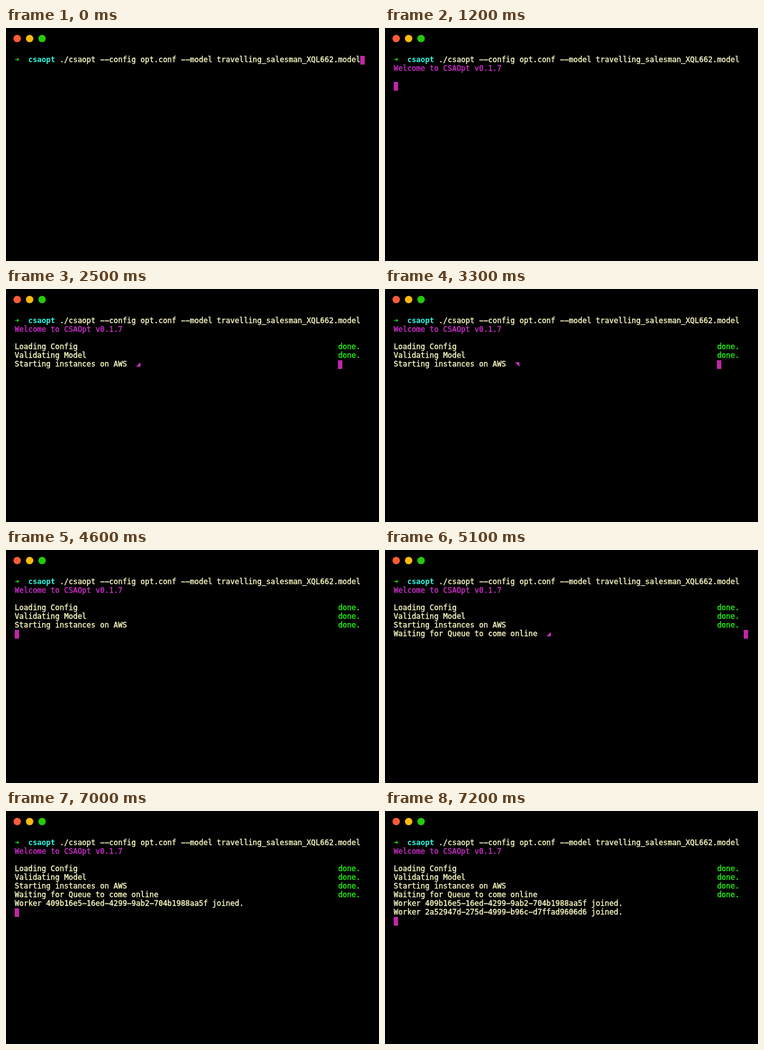
These frames come from a looping animation (600x376 px, 8000 ms). An HTML page with a canvas:

```html
<!DOCTYPE html>
<html lang="en">
<head>
<meta charset="utf-8">
<title>csaopt terminal</title>
<style>
  html, body { margin: 0; width: 100%; height: 100%; overflow: hidden; background: #000; }
  canvas { display: block; width: 600px; height: 376px; }
</style>
</head>
<body>
<canvas id="term" width="600" height="376"></canvas>
<script>
const canvas = document.getElementById('term');
const ratio = window.devicePixelRatio || 1;
canvas.width = 600 * ratio;
canvas.height = 376 * ratio;
const ctx = canvas.getContext('2d');
ctx.scale(ratio, ratio);

const LOOP = 8000;
const LEFT = 14, TOP = 44, CELL = 7.224, LINE = 14;
const FONT = '12px "DejaVu Sans Mono", monospace';
const CREAM = '#fffdc6', GREEN = '#22f914', CYAN = '#2cfce4';
const MAGENTA = '#cf2fcb', CURSOR = '#c126a8';

const colX = col => LEFT + col * CELL;
const rowY = row => TOP + row * LINE;

// Terminal output: time shown, row, column, text, colour
const output = [
  [0, 0, 0, '➜', GREEN, 'bold '],
  [0, 0, 3, 'csaopt', CYAN, 'bold '],
  [0, 0, 10, './csaopt --config opt.conf --model travelling_salesman_XQL662.model', CREAM],
  [1200, 1, 0, 'Welcome to CSAOpt v0.1.7', MAGENTA],
  [1700, 3, 0, 'Loading Config', CREAM],
  [1700, 3, 72, 'done.', GREEN],
  [2100, 4, 0, 'Validating Model', CREAM],
  [2100, 4, 72, 'done.', GREEN],
  [2500, 5, 0, 'Starting instances on AWS', CREAM],
  [4500, 5, 72, 'done.', GREEN],
  [4900, 6, 0, 'Waiting for Queue to come online', CREAM],
  [6500, 6, 72, 'done.', GREEN],
  [6600, 7, 0, 'Worker 409b16e5-16ed-4299-9ab2-704b1988aa5f joined.', CREAM],
  [7100, 8, 0, 'Worker 2a52947d-275d-4999-b96c-d7ffad9606d6 joined.', CREAM]
];

// Cursor stops: time, row, column
const stops = [
  [0, 0, 77], [1200, 3, 0], [1700, 4, 0], [2100, 5, 0], [2500, 5, 72],
  [4500, 6, 0], [4900, 6, 79], [5100, 6, 78], [6500, 7, 0], [6600, 8, 0], [7100, 9, 0]
];

// Each tick turns the triangle a quarter clockwise
const spinners = [
  { row: 5, col: 27, end: 4500, ticks: [2500, 2900, 3100, 3300, 3700, 4000, 4100] },
  { row: 6, col: 34, end: 6500, ticks: [4900, 5300, 5700, 6000, 6100] }
];

function drawText(row, col, text, color, weight = '') {
  ctx.font = weight + FONT;
  ctx.fillStyle = ctx.strokeStyle = color;
  ctx.lineWidth = 0.35;
  [...text].forEach((ch, i) => {
    if (ch === ' ') return;
    const glyph = ch === '-' ? '\u2212' : ch; // wide terminal dash
    const x = colX(col + i), y = rowY(row) + 11;
    ctx.fillText(glyph, x, y);
    if (!weight) ctx.strokeText(glyph, x, y);
  });
}

function drawSpinner({ row, col, end, ticks }, t) {
  if (t < ticks[0] || t >= end) return;
  const turn = ticks.filter(tick => tick <= t).length - 1;
  ctx.save();
  ctx.translate(colX(col) + 3.7, rowY(row) + 7.7);
  ctx.rotate(turn * Math.PI / 2);
  ctx.fillStyle = MAGENTA;
  ctx.beginPath();
  ctx.moveTo(3.5, -3.5);
  ctx.lineTo(3.5, 3.5);
  ctx.lineTo(-3.5, 3.5);
  ctx.fill();
  ctx.restore();
}

function drawCursor(t) {
  const [, row, col] = stops.filter(stop => stop[0] <= t).pop();
  ctx.fillStyle = CURSOR;
  ctx.fillRect(Math.round(colX(col)), rowY(row) + 1, 7, 14);
}

function drawButtons() {
  ['#ff5b38', '#ffb90f', '#25c90b'].forEach((color, i) => {
    ctx.fillStyle = color;
    ctx.beginPath();
    ctx.arc(18 + 20 * i, 17, 6, 0, Math.PI * 2);
    ctx.fill();
  });
}

function draw(t) {
  ctx.fillStyle = '#000';
  ctx.fillRect(0, 0, 600, 376);
  drawButtons();
  for (const [shown, ...item] of output) if (t >= shown) drawText(...item);
  for (const spinner of spinners) drawSpinner(spinner, t);
  drawCursor(t);
}

const start = performance.now();
function tick() {
  draw((performance.now() - start) % LOOP);
  requestAnimationFrame(tick);
}
tick();
</script>
</body>
</html>
```
